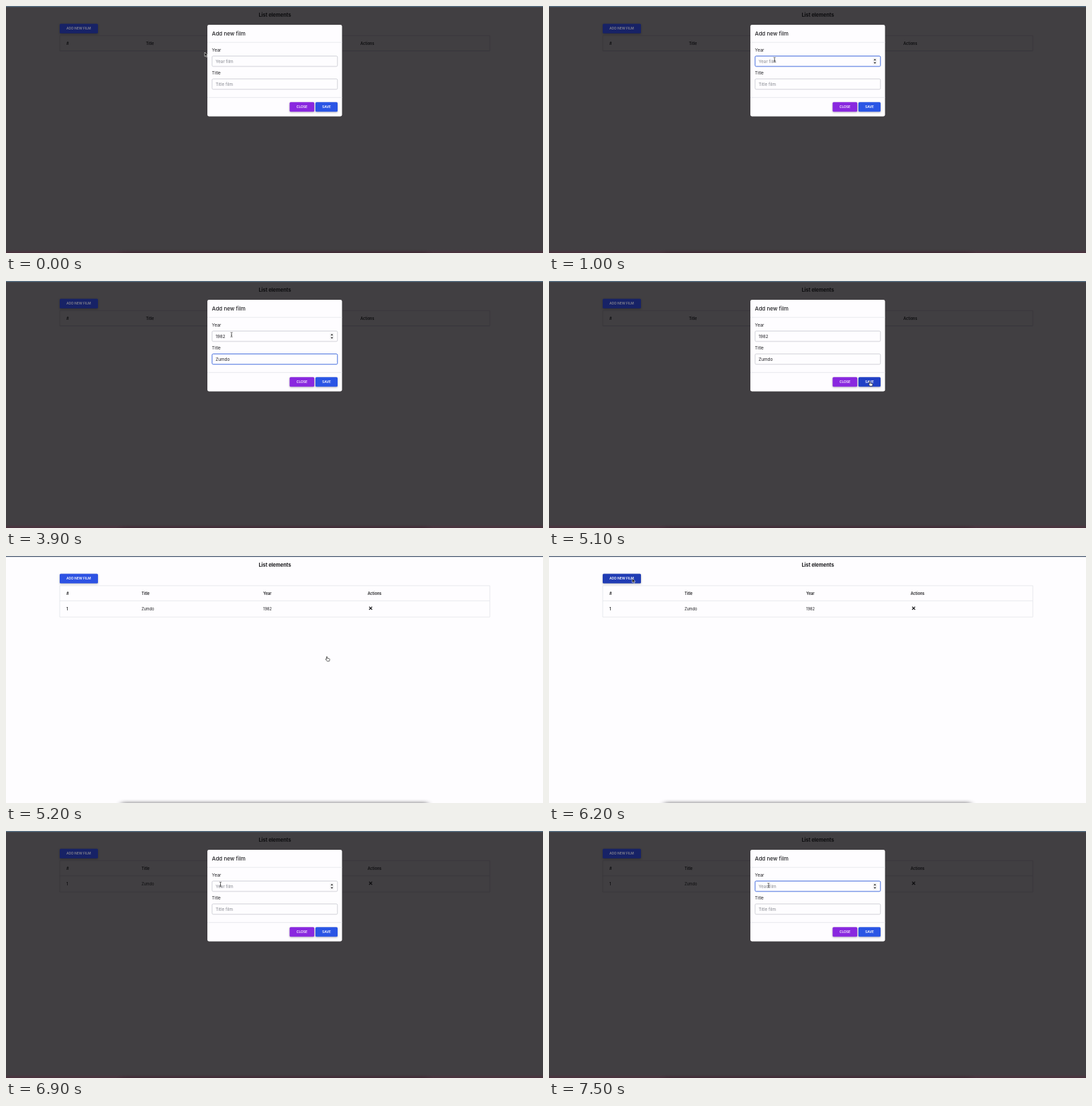
These frames come from a looping animation (800x368 px, 8 s). An HTML page:

```html
<!DOCTYPE html>
<html lang="en">
<head>
<meta charset="utf-8">
<title>List elements</title>
<style>
  html, body { margin: 0; width: 100%; height: 100%; overflow: hidden; }
  svg { display: block; width: 100vw; height: 100vh; font-family: Inter, sans-serif;
    --bg: #fefdff; --line: #e3e4e9; --ink: #18181b; --add: #2d52e3; --label: #fff; --strip: #46566e; }
  svg.dim { --bg: #413f42; --line: #39373b; --ink: #0c0c0e; --add: #172266; --label: #85848c; --strip: #587389; }
  text { white-space: pre; }
  .cell { font-size: 5.6px; fill: var(--ink); }
  .strong { font-weight: 600; }
  .caps { font-size: 4.95px; font-weight: 600; fill: #fff; }
  .body { font-size: 6.4px; fill: #202024; }
  .hint { fill: #85888f; }
  .line { stroke: var(--line); stroke-width: .8; fill: none; }
  .raised { filter: drop-shadow(0 1.2px 1.4px #0004); }
  .field { fill: #fefdff; stroke: #c5c6cd; stroke-width: .8; }
  .field.focus { stroke: #3e68dc; stroke-width: 1; }
</style>
</head>
<body>
<svg id="stage" viewBox="0 0 800 368" preserveAspectRatio="none">
  <defs>
    <filter id="soft" x="-10%" y="-300%" width="120%" height="700%"><feGaussianBlur stdDeviation="4 2.5"/></filter>
    <linearGradient id="floor" x2="0" y2="1">
      <stop stop-color="#413f42"/><stop offset="1" stop-color="#4c303d"/>
    </linearGradient>
  </defs>

  <rect width="800" height="368" fill="var(--bg)"/>
  <rect id="foot" y="363" width="800" height="5" fill="url(#floor)"/>
  <rect id="dock" x="172" y="367" width="456" height="6" fill="#000" filter="url(#soft)"/>
  <rect width="800" height="1.3" fill="var(--strip)"/>
  <text x="400.5" y="16.3" text-anchor="middle" font-size="7.4" font-weight="700" fill="var(--ink)">List elements</text>
  <rect id="add" class="raised" x="80" y="26.4" width="57" height="14.4" rx="1.6"/>
  <text class="caps" x="90" y="35.4" style="fill:var(--label)">ADD NEW FILM</text>

  <path id="frame" class="line"/>
  <text class="cell strong" x="90" y="57.6">#</text>
  <text id="headTitle" class="cell strong" y="57.6">Title</text>
  <text id="headYear" class="cell strong" y="57.6">Year</text>
  <text id="headActions" class="cell strong" y="57.6">Actions</text>
  <g id="row">
    <text class="cell strong" x="90" y="80.8">1</text>
    <text class="cell" x="202" y="80.8">Zumdo</text>
    <text class="cell" x="383.3" y="80.8">1982</text>
    <path d="M541 75.6l4.4 4.4m0-4.4l-4.4 4.4" stroke="var(--ink)" stroke-width="1.3"/>
  </g>

  <g id="modal">
    <rect x="300" y="28" width="200.6" height="136.4" rx="2.4" fill="#fefdff"/>
    <path d="M300 54.2h200.6M300 136.3h200.6" stroke="#e4e4ea" stroke-width=".8"/>
    <text x="306.8" y="43.8" font-size="8" font-weight="500" fill="#202024">Add new film</text>
    <text class="body" x="306.8" y="68.3">Year</text>
    <text class="body" x="306.8" y="102.4">Title</text>
    <rect id="yearBox" class="field" x="307" y="74.6" width="186.8" height="15.4" rx="1.6"/>
    <rect id="titleBox" class="field" x="307" y="108.7" width="186.8" height="15.4" rx="1.6"/>
    <text id="yearText" class="body" x="312.2" y="84.7"></text>
    <text id="titleText" class="body" x="312.2" y="118.8"></text>
    <rect id="caret" width=".6" height="7.6" fill="#202024"/>
    <g id="spinner">
      <rect x="482.6" y="77.2" width="5.8" height="10.4" rx=".8" fill="#efeff1"/>
      <path d="M483.7 81.1l1.8-2.3 1.8 2.3zM483.7 83.7l1.8 2.3 1.8-2.3z" fill="#333"/>
    </g>
    <rect class="raised" x="422.5" y="143.2" width="36.8" height="14.3" rx="1.6" fill="#8928df"/>
    <text class="caps" x="440.9" y="152.2" text-anchor="middle">CLOSE</text>
    <rect id="save" class="raised" x="461" y="143.2" width="33" height="14.3" rx="1.6"/>
    <text class="caps" x="477.5" y="152.2" text-anchor="middle">SAVE</text>
  </g>

  <g id="pointer">
    <path id="arrow" d="M0 0v6.2l1.5-1.3 1 2.3 1.1-.5-1-2.2h2z" fill="#111" stroke="#fff" stroke-width=".6"/>
    <path id="hand" d="M-.6 .6q.6-1 1.2 0v2.2l3 .7q.9.3.7 1.3l-.6 2.4h-3.4l-2.3-2.9q.3-.9 1.4 0z" fill="#fff" stroke="#222" stroke-width=".7"/>
    <path id="beam" d="M-1.5-3.4q1.5 0 1.5.8 0-.8 1.5-.8M0-2.6v5.2M-1.5 3.4q1.5 0 1.5-.8 0 .8 1.5.8M-.8 .8h1.6" fill="none" stroke="#222" stroke-width=".7"/>
  </g>
</svg>
<script>
const LOOP = 8000, TICK = 100;
const $ = id => document.getElementById(id);
const within = (t, ...spans) => spans.some(([a, b]) => t >= a && t < b);
const show = (id, on) => { $(id).style.display = on ? '' : 'none'; };

// time, x, y, pointer shape from that time on
const path = [
  [0, 296, 69, 'arrow'], [200, 309, 76, 'beam'], [500, 336, 80, 'beam'],
  [1100, 336, 80, ''], [3900, 336, 80, 'beam'], [4100, 352, 91, 'arrow'],
  [4300, 396, 113, 'beam'], [4400, 430, 127, 'arrow'], [4600, 477.3, 149, 'hand'],
  [5200, 478, 149.5, 'hand'], [5300, 476, 149, 'arrow'], [5450, 430, 134, 'arrow'],
  [5800, 165, 48, 'arrow'], [6000, 124, 33.5, 'arrow'], [6400, 124, 33.5, 'arrow'],
  [6600, 225, 58, 'arrow'], [6800, 312, 78, 'beam'], [7000, 327, 81, 'beam'], [LOOP, 327, 81, 'beam']
];
const yearKeys = [1100, 1400, 1500, 1700];
const titleKeys = [2900, 3000, 3200, 3300, 3400];
const typed = (word, keys, t) => word.slice(0, keys.filter(k => t >= k).length);

function pointerAt(t) {
  const i = path.findIndex((p, n) => t >= p[0] && t < path[n + 1][0]);
  const [t0, x0, y0, shape] = path[i], [t1, x1, y1] = path[i + 1];
  const k = (t - t0) / (t1 - t0);
  return { x: x0 + (x1 - x0) * k, y: y0 + (y1 - y0) * k, shape };
}

function setField(name, value, hint, focused) {
  const text = $(name + 'Text');
  text.textContent = value || hint;
  text.classList.toggle('hint', !value);
  $(name + 'Box').classList.toggle('focus', focused);
  if (focused) {
    $('caret').setAttribute('x', 312.2 + (value ? text.getComputedTextLength() + .2 : 0));
    $('caret').setAttribute('y', name === 'year' ? 78.5 : 112.6);
  }
}

function render(t) {
  const open = !within(t, [5200, 6300]);
  const hasRow = t >= 5200;
  const reopened = t >= 6300;

  $('stage').classList.toggle('dim', open);
  show('modal', open);
  show('foot', open);
  $('dock').style.opacity = open ? .2 : .45;
  $('add').style.fill = within(t, [6000, 6300]) ? '#203cb4' : 'var(--add)';
  $('save').style.fill = within(t, [4600, 5200]) ? '#2140c6' : '#2a55e5';

  show('row', hasRow);
  $('frame').setAttribute('d', `M80 44.2H720.8V${hasRow ? '91' : '66.8'}H80zM80 66.8H720.8`);
  $('headTitle').setAttribute('x', hasRow ? 202 : 208.4);
  $('headYear').setAttribute('x', hasRow ? 383.3 : 372);
  $('headActions').setAttribute('x', hasRow ? 538.8 : 528);

  if (open) {
    setField('year', reopened ? '' : typed('1982', yearKeys, t), 'Year film', within(t, [500, 2600], [7000, LOOP]));
    setField('title', reopened ? '' : typed('Zumdo', titleKeys, t), 'Title film', within(t, [2600, 4900]));
    show('caret', within(t, [500, 1000], [1100, 2200], [2600, 3900], [4400, 4900], [7000, 7500]));
    show('spinner', within(t, [200, 4100], [6800, LOOP]));
  }

  const { x, y, shape } = pointerAt(t);
  $('pointer').setAttribute('transform', `translate(${x} ${y})`);
  for (const id of ['arrow', 'hand', 'beam']) show(id, id === shape);
}

const start = performance.now();
function loop() {
  const t = (performance.now() - start) % LOOP;
  render(Math.floor(t / TICK) * TICK);
  requestAnimationFrame(loop);
}
loop();
</script>
</body>
</html>
```
